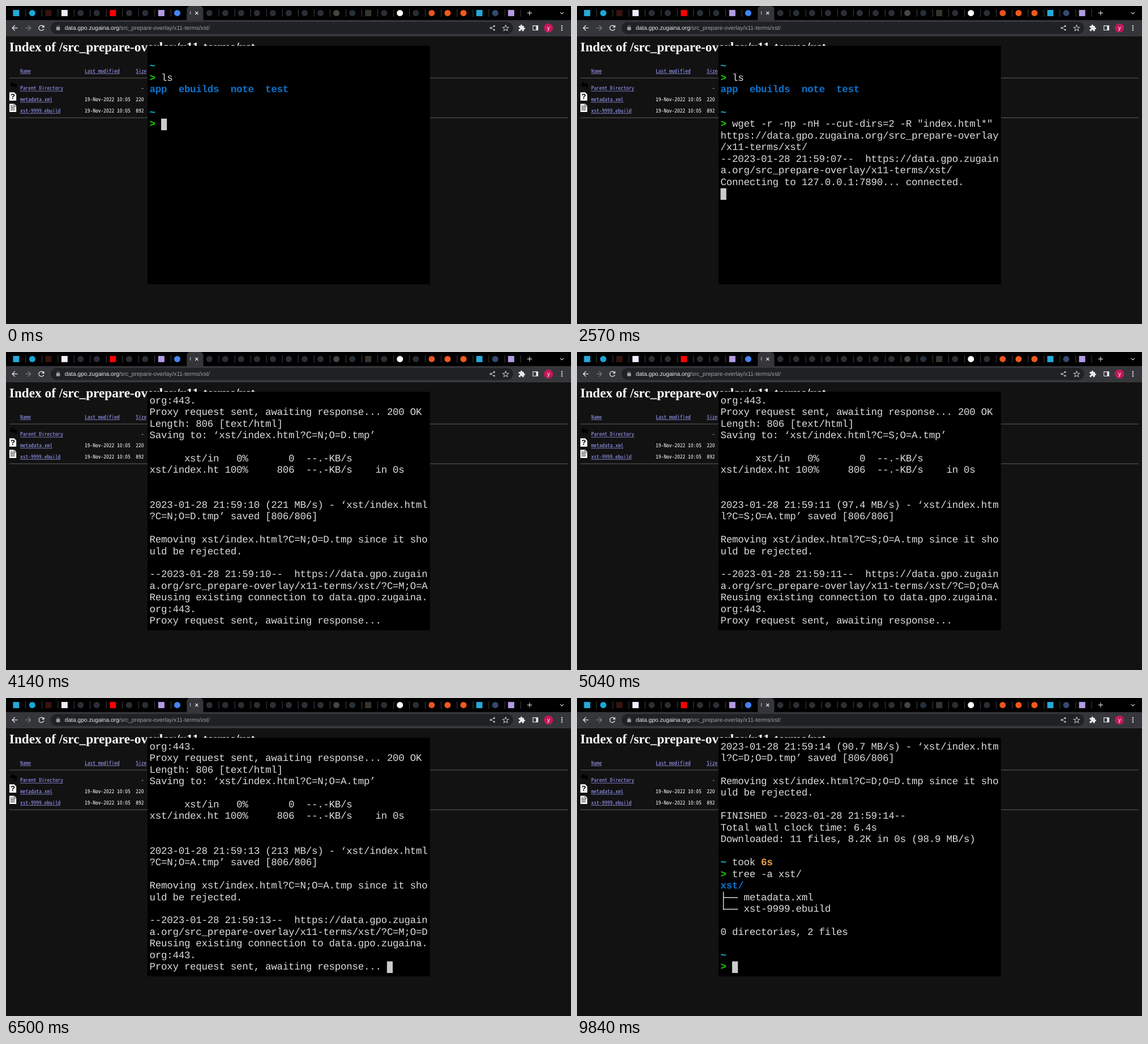
Recreate the animation shown at these times as an HTML page with a canvas. Size 998 px wide and 561 px high, loop 9940 ms.

```html
<!DOCTYPE html>
<html lang="en">
<head>
<meta charset="utf-8">
<title>Recursive download</title>
<style>
  html, body { margin: 0; width: 100%; height: 100%; overflow: hidden; background: #121212; }
  canvas { display: block; width: 998px; height: 561px; }
</style>
</head>
<body>
<canvas id="stage" width="998" height="561"></canvas>
<script>
const ctx = document.getElementById('stage').getContext('2d');
const LOOP = 9940;
const SCALE = 998 / 1366; // everything is laid out on a 1366 x 768 desktop
const COLS = 48, ROWS = 20, CELL_W = 14, CELL_H = 28, TERM_X = 347, TERM_Y = 104;
const MONO = '"Liberation Mono", monospace';
const SANS = '"Liberation Sans", sans-serif';
const LISTING = '"Noto Sans Mono CJK SC", "Noto Sans Mono CJK JP", "Noto Sans CJK", "Noto Sans Mono", monospace';

const STYLES = {
  text: { color: '#dddddd' },
  paste: { color: '#000000', back: '#dddddd' },
  dir: { color: '#0d73cc', bold: true },
  path: { color: '#0dbccd', bold: true },
  prompt: { color: '#19cb00', bold: true },
  time: { color: '#eba24a', bold: true }
};

// ---- Terminal session -------------------------------------------------

let lines = [[]];
const states = [];

function write(text, style = 'text') {
  for (const ch of text) {
    if (ch === '\n') { lines.push([]); continue; }
    if (lines.at(-1).length === COLS) lines.push([]);
    lines.at(-1).push({ ch, style });
  }
}

function restyle(from, to) {
  lines = lines.map(line => line.map(c => c.style === from ? { ch: c.ch, style: to } : c));
}

function show(time) {
  states.push({ time, rows: lines.slice(-ROWS).map(line => line.slice()) });
}

function prompt(took) {
  write('\n');
  write('~', 'path');
  if (took) { write(' took '); write(took, 'time'); }
  write('\n');
  write('>', 'prompt');
  write(' ');
}

const HOST = 'https://data.gpo.zugaina.org/';
const FOLDER = HOST + 'src_prepare-overlay/x11-terms/xst/';
const stamp = time => {
  const seconds = Math.floor(7.85 + (time - 1220) / 1000);
  return '2023-01-28 21:59:' + String(seconds).padStart(2, '0');
};

function request(time, url) {
  write(`--${stamp(time)}--  ${url}\n`);
  write('Reusing existing connection to data.gpo.zugaina.org:443.\n');
  write('Proxy request sent, awaiting response... ');
}

function receive(time, file, size, type, speed) {
  const path = 'xst/' + file;
  const listed = file.startsWith('index');
  const label = path.slice(0, 12);
  const early = listed ? '      xst/in' : label;
  write(`200 OK\nLength: ${size} [${type}]\nSaving to: ‘${path}’\n\n`);
  write(`${early}   0%       0  --.-KB/s\n`);
  write(`${label} 100%     ${size}  --.-KB/s    in 0s\n\n\n`);
  write(`${stamp(time)} (${speed} MB/s) - ‘${path}’ saved [${size}/${size}]\n\n`);
}

const reject = file => write(`Removing xst/${file} since it should be rejected.\n\n`);

function receiveIndex(time, order, speed) {
  const file = `index.html?${order}.tmp`;
  receive(time, file, 806, 'text/html', speed);
  reject(file);
}

function buildSession() {
  write('\n');
  write('~', 'path');
  write('\n');
  write('>', 'prompt');
  write(' ls\n');
  ['app', 'ebuilds', 'note', 'test'].forEach((name, i) => {
    if (i) write('  ');
    write(name, 'dir');
  });
  write('\n');
  prompt();
  show(0);

  write('wget -r -np -nH --cut-dirs=2 -R "index.html*" ' + FOLDER, 'paste');
  show(370);

  restyle('paste', 'text');
  write(`\n--${stamp(1220)}--  ${FOLDER}\n`);
  write('Connecting to 127.0.0.1:7890... connected.\n');
  show(1220);

  write('Proxy request sent, awaiting response... ');
  show(3020);

  receive(3400, 'index.html.tmp', 806, 'text/html', '140');
  write('Loading robots.txt; please ignore errors.\n');
  request(3400, HOST + 'robots.txt');
  show(3400);

  write(`404 Not Found\n${stamp(3760)} ERROR 404: Not Found.\n\n`);
  reject('index.html.tmp');
  request(3760, FOLDER + '?C=N;O=D');
  show(3760);

  const xml = 'metadata.xml', ebuild = 'xst-9999.ebuild';
  const steps = [
    [4140, '?C=N;O=D', '221', '?C=M;O=A'],
    [4500, '?C=M;O=A', '204', '?C=S;O=A'],
    [4880, '?C=S;O=A', '97.4', '?C=D;O=A'],
    [5250, '?C=D;O=A', '203', xml],
    [5610, xml, '31.0', ebuild],
    [5990, ebuild, '119', '?C=N;O=A'],
    [6370, '?C=N;O=A', '213', '?C=M;O=D'],
    [6730, '?C=M;O=D', '92.1', '?C=S;O=D'],
    [7100, '?C=S;O=D', '204', '?C=D;O=D'],
    [7480, '?C=D;O=D', '90.7', null]
  ];
  for (const [time, file, speed, next] of steps) {
    if (file === xml) receive(time, file, 220, 'application/xml', speed);
    else if (file === ebuild) receive(time, file, 892, 'text/plain', speed);
    else receiveIndex(time, file.slice(1), speed);
    if (!next) break;
    request(time, FOLDER + next);
    show(time);
  }
  write(`FINISHED --${stamp(7480)}--\nTotal wall clock time: 6.4s\n`);
  write('Downloaded: 11 files, 8.2K in 0s (98.9 MB/s)\n');
  prompt('6s');
  show(7480);

  write('tree -a xst/', 'paste');
  show(8080);

  restyle('paste', 'text');
  write('\n');
  write('xst/', 'dir');
  write('\n├── metadata.xml\n└── xst-9999.ebuild\n\n0 directories, 2 files\n');
  prompt();
  show(8460);
}

// The cursor starts visible and flips at each of these times.
const BLINKS = [2070, 2570, 3070, 3560, 4060, 4550, 5040, 5510, 6040, 6500, 6990, 7480, 9340, 9840];

// ---- Drawing helpers --------------------------------------------------

function rect(x, y, w, h, color) {
  ctx.fillStyle = color;
  ctx.fillRect(x, y, w, h);
}

function round(x, y, w, h, radii, color) {
  ctx.fillStyle = color;
  ctx.beginPath();
  ctx.roundRect(x, y, w, h, radii);
  ctx.fill();
}

function disc(x, y, r, color) {
  ctx.fillStyle = color;
  ctx.beginPath();
  ctx.arc(x, y, r, 0, 7);
  ctx.fill();
}

function label(text, x, y, font, color) {
  ctx.font = font;
  ctx.fillStyle = color;
  ctx.fillText(text, x, y);
}

// Icons live on a 24 x 24 grid centred on (x, y).
function icon(path, x, y, size, color, stroke) {
  ctx.save();
  ctx.translate(x - size / 2, y - size / 2);
  ctx.scale(size / 24, size / 24);
  const shape = new Path2D(path);
  ctx.fillStyle = ctx.strokeStyle = color;
  ctx.lineWidth = stroke || 1;
  if (stroke) ctx.stroke(shape); else ctx.fill(shape, 'evenodd');
  ctx.restore();
}

// ---- Browser ----------------------------------------------------------

const DIM = '#2a2f36';
const TABS_LEFT = ['s#25a9d8', 'c#18a8d8', 's#38130f', 's#eeeeff', 'c' + DIM, 'c' + DIM, 's#ff0000',
  'c' + DIM, 'c' + DIM, 's#b29ae4', 'c#4285f4'];
const TABS_RIGHT = [...Array(8).fill('c' + DIM), 'c#454545', 'c#24303b', 's#34352e', 'c' + DIM, 'c#ffffff',
  'c' + DIM, 'c#e95420', 'c#f4581c', 'c#f4581c', 's#25a9d8', 'c#344a6e', 's#b29ae4'];

function tab(code, divider) {
  const x = divider - 23, color = code.slice(1);
  if (code[0] === 'c') disc(x, 17, 7.5, color);
  else rect(x - 7.5, 9.5, 15, 15, color);
  rect(divider - .5, 8, 1.2, 18, '#4c4d50');
}

function drawTabs() {
  rect(0, 0, 1366, 34, '#000000');
  TABS_LEFT.forEach((code, i) => { if (i < 10) tab(code, 47.5 + 39 * i); });
  disc(414, 17, 7.5, TABS_LEFT[10].slice(1));
  TABS_RIGHT.forEach((code, i) => tab(code, 514.6 + 38.4 * i));
  round(437, 0, 40, 36, [8, 8, 0, 0], '#35363a');
  label('I', 444, 21, '12px ' + SANS, '#e8eaed');
  icon('M5 5L19 19M19 5L5 19', 461, 17, 12, '#e8eaed', 3.4);
  icon('M12 3V21M3 12H21', 1266, 17, 15, '#d0d2d5', 2.6);
  icon('M4 8L12 16L20 8', 1344, 17, 13, '#d0d2d5', 3);
}

function drawToolbar() {
  const light = '#e8eaed', grey = '#bdc1c6', y = 53;
  const arrow = 'M20 11H7.8l5.6-5.6L12 4l-8 8 8 8 1.4-1.4L7.8 13H20z';
  rect(0, 34, 1366, 38, '#35363a');
  rect(0, 72, 1366, 1.2, '#4d4e51');
  icon(arrow, 21, y, 21, light);
  icon('M4 11H16.2L10.6 5.4 12 4l8 8-8 8-1.4-1.4L16.2 13H4z', 54, y, 21, '#7c7d80');
  icon('M17.65 6.35A8 8 0 1 0 19.73 14h-2.08A6 6 0 1 1 12 6c1.66 0 3.14.69 4.22 1.78L13 11h7V4z', 85.5, y, 21, light);
  round(108, 38.5, 1118, 29, 14.5, '#202124');
  icon('M18 8h-1V6A5 5 0 0 0 7 6v2H6a2 2 0 0 0-2 2v10a2 2 0 0 0 2 2h12a2 2 0 0 0 2-2V10a2 2 0 0 0-2-2zM9 6a3 3 0 0 1 6 0v2H9z', 126, y, 13.5, '#9aa0a6');
  label('data.gpo.zugaina.org', 142, 58, '14px ' + SANS, light);
  label('/src_prepare-overlay/x11-terms/xst/', 273.3, 58, '14px ' + SANS, '#9aa0a6');
  icon('M18 5L6 12L18 19', 1176, y, 15, grey, 2);
  [[4.2, -4.5], [-4.2, 0], [4.2, 4.5]].forEach(([dx, dy]) => disc(1176 + dx, y + dy, 2.2, grey));
  icon('M12 3l2.7 6.2 6.8.6-5.1 4.4 1.5 6.6L12 17.3l-5.9 3.5 1.5-6.6-5.1-4.4 6.8-.6z', 1208, y, 18, grey, 2);
  icon('M20.5 11H19V7a2 2 0 0 0-2-2h-4V3.5a2.5 2.5 0 0 0-5 0V5H4a2 2 0 0 0-2 2v3.8h1.5a2.7 2.7 0 0 1 0 5.4H2V20a2 2 0 0 0 2 2h3.8v-1.5a2.7 2.7 0 0 1 5.4 0V22H17a2 2 0 0 0 2-2v-4h1.5a2.5 2.5 0 0 0 0-5z', 1247, y, 18, light);
  icon('M3 4H21V20H3zM5 6H14V18H5z', 1280, y, 18, light);
  disc(1311.5, y, 11, '#c2185b');
  ctx.textAlign = 'center';
  label('y', 1311.5, 57, '14px ' + SANS, '#ffffff');
  ctx.textAlign = 'left';
  [-5, 0, 5].forEach(dy => disc(1344, y + dy, 1.7, light));
}

function listing(text, x, y, link) {
  const color = link ? '#9e9eff' : '#ffffff';
  [...text].forEach((ch, i) => label(ch, x + 6.5 * i, y, '13px ' + LISTING, color));
  if (link) rect(x, y + 2, 6.5 * text.length, 1, color);
}

function drawPage() {
  const name = 34.2, date = 190.2, size = 313.7;
  rect(0, 73, 1366, 695, '#121212');
  label('Index of /src_prepare-overlay/x11-terms/xst', 8, 109.5, 'bold 31.85px "Liberation Serif", serif', '#ffffff');
  listing('Name', name, 161, true);
  listing('Last modified', date, 161, true);
  listing('Size', size, 161, true);
  [173, 269].forEach(y => rect(8, y, 1350, 1.8, '#4c4c4c'));
  listing('Parent Directory', name, 203, true);
  listing('-', size + 13, 203);
  [['metadata.xml', '220', 230], ['xst-9999.ebuild', '892', 257]].forEach(([file, bytes, y]) => {
    listing(file, name, y, true);
    listing('19-Nov-2022 10:05', date, y);
    listing(bytes, size, y);
  });

  icon('M1 9L11 1V6H18Q23 8 22 15L17 23V14H11V18z', 18, 192, 20, '#000000');
  const page = 'M2 0H16L22 6V24H2z';
  icon(page, 16.5, 218.5, 20, '#ffffff');
  label('?', 11, 225, 'bold 18px ' + SANS, '#000000');
  icon(page, 16.5, 246, 20, '#ffffff');
  icon('M5 6H12M5 10H18M5 14H18M5 18H18M15 1V7H21', 16.5, 246, 20, '#222222', 1.6);
}

// ---- Terminal ---------------------------------------------------------

function drawCell({ ch, style }, x, y) {
  const { color, back, bold } = STYLES[style];
  if (back) rect(x, y, CELL_W, CELL_H, back);
  if (ch === ' ') return;
  if ('├└─'.includes(ch)) {
    const left = ch === '─' ? 0 : 6;
    rect(x + left, y + 13, CELL_W - left, 2, color);
    if (left) rect(x + 6, y, 2, ch === '├' ? CELL_H : 15, color);
    return;
  }
  label(ch, x, y + 20, (bold ? 'bold ' : '') + '24px ' + MONO, color);
}

function drawTerminal(time) {
  const { rows } = states.findLast(s => s.time <= time);
  rect(342, 96, 683, 576, '#000000');
  rows.forEach((row, r) => row.forEach((cell, c) =>
    drawCell(cell, TERM_X + c * CELL_W, TERM_Y + r * CELL_H)));
  const visible = BLINKS.filter(t => t <= time).length % 2 === 0;
  if (visible) {
    rect(TERM_X + rows.at(-1).length * CELL_W, TERM_Y + (rows.length - 1) * CELL_H, CELL_W, CELL_H, '#cccccc');
  }
}

function draw() {
  const time = performance.now() % LOOP;
  ctx.setTransform(SCALE, 0, 0, SCALE, 0, 0);
  ctx.textRendering = 'geometricPrecision';
  drawTabs();
  drawToolbar();
  drawPage();
  drawTerminal(time);
  requestAnimationFrame(draw);
}

buildSession();
draw();
</script>
</body>
</html>
```
